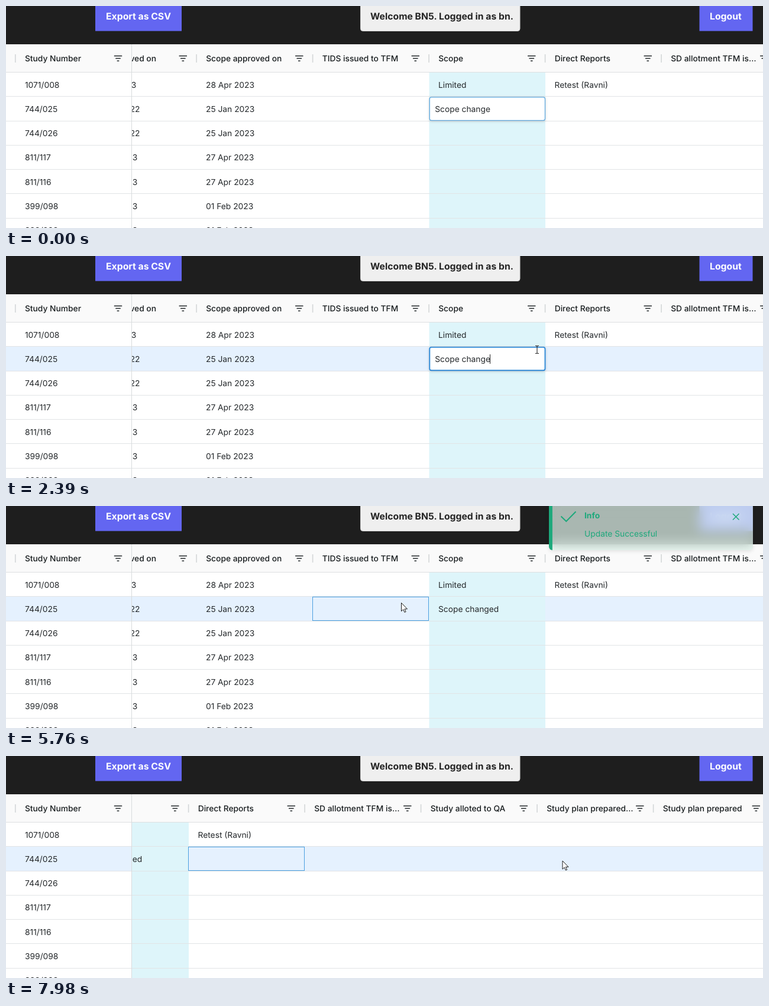
An HTML page for the animation above (8000 ms loop, 1280 by 377 pixels).

```html
<!DOCTYPE html>
<html lang="en">
<head>
<meta charset="utf-8">
<title>Study grid</title>
<style>
  html, body { margin: 0; width: 100%; height: 100%; overflow: hidden; background: #fff; }
  #stage { position: relative; width: 1280px; height: 377px; overflow: hidden; }
  svg { position: absolute; left: 0; top: 0; display: block; }
  text {
    font-family: Inter, Roboto, sans-serif; font-size: 13.8px;
    fill: #24282b; text-rendering: geometricPrecision; white-space: pre;
  }
  .head { font-weight: 500; fill: #181d1f; }
  .btn { font-size: 15.75px; font-weight: 700; fill: #fff; }
  .end { text-anchor: end; }
  #editor rect { fill: #fff; filter: drop-shadow(0 1px 2px rgba(0, 0, 0, .16)); }
  #toast {
    position: absolute; left: 918px; top: -5px; width: 344.5px; height: 80px;
    border-radius: 6px; overflow: hidden;
    background: rgba(228, 248, 240, .7);
    backdrop-filter: blur(10px);
    box-shadow: 0 2px 6px rgba(0, 0, 0, .1);
  }
  #toast text { fill: #1ea97c; }
  #toast path { fill: none; stroke: #1ea97c; }
</style>
</head>
<body>
<div id="stage">
  <svg id="view" width="1280" height="377" viewBox="0 0 1280 377">
    <defs><clipPath id="right"><rect x="213" y="65" width="1067" height="312"/></clipPath></defs>
    <rect width="1280" height="377" fill="#fff"/>
    <rect width="1280" height="65" fill="#1e1e1e"/>
    <rect x="151" y="-6" width="146" height="48.5" fill="#6366f1"/>
    <rect x="599.5" y="-6" width="269.5" height="48.5" rx="4" fill="#efefef" stroke="#d0d0d0"/>
    <rect x="1172.5" y="-6" width="90" height="48.5" fill="#6366f1"/>
    <text class="btn" x="169" y="23">Export as CSV</text>
    <text class="btn" x="616" y="23" style="fill:#242424">Welcome BN5. Logged in as bn.</text>
    <text class="btn" x="1190" y="23">Logout</text>
    <rect y="65" width="1280" height="47" fill="#fafafa"/>
    <rect id="hover" width="1280" height="41" fill="#e5f1fe"/>
    <g clip-path="url(#right)"><g id="cols"></g></g>
    <g id="lines"></g>
    <g id="pinned"></g>
    <g clip-path="url(#right)">
      <g id="over">
        <rect id="focus" y="154.5" width="196" height="40" fill="none" stroke="#4a9fe0"/>
        <g id="editor">
          <rect x="716.3" y="154.9" width="195.2" height="39.4" rx="3"/>
          <text x="725.2" y="179.9"></text>
          <path id="caret" stroke="#222"/>
        </g>
      </g>
    </g>
    <circle id="click" r="13" fill="#ff0" fill-opacity=".45"/>
    <path id="arrow" d="M0 0V14.2L3.3 11.2 5.4 16 7.6 15.1 5.5 10.4H10Z" fill="#fff" stroke="#1a1a1a"/>
    <path id="beam" d="M-3 -6.5H-1L0 -5.8 1 -6.5H3M0 -5.8V5.8M-3 6.5H-1L0 5.8 1 6.5H3" fill="none" stroke="#222" stroke-width="1.1"/>
  </svg>
  <div id="toast">
    <svg width="345" height="80" viewBox="918 -5 345 80">
      <rect x="918" y="-5" width="5.9" height="80" fill="#1ea97c"/>
      <path d="M938.5 17.5L947.3 26 963.5 9.5" stroke-width="2"/>
      <path d="M1229 13L1239.5 23.5M1239.5 13L1229 23.5" stroke-width="1.5"/>
      <text x="978" y="21" font-weight="700">Info</text>
      <text x="978" y="52">Update Successful</text>
    </svg>
  </div>
</div>
<script>
const NS = 'http://www.w3.org/2000/svg';
const LOOP = 8000, COL = 196.5, FIRST = 125.3;
const $ = id => document.getElementById(id);

function add(parent, tag, attrs, label) {
  const el = document.createElementNS(NS, tag);
  for (const k in attrs) el.setAttribute(k, attrs[k]);
  if (label) el.textContent = label;
  parent.appendChild(el);
  return el;
}

const colX = i => FIRST + COL * i;
const rowY = i => Math.floor(112.5 + 41.25 * i);
const baseY = i => 138.7 + 41.2 * i;

const heads = ['Study approved on', 'Scope approved on', 'TIDS issued to TFM', 'Scope', 'Direct Reports',
  'SD allotment TFM is…', 'Study alloted to QA', 'Study plan prepared…', 'Study plan prepared'];
const rows = [
  ['1071/008', '11 Apr 2023', '28 Apr 2023', 220.3],
  ['744/025', '28 Dec 2022', '25 Jan 2023', 226.5],
  ['744/026', '28 Dec 2022', '25 Jan 2023', 226.5],
  ['811/117', '17 Apr 2023', '27 Apr 2023', 222.3],
  ['811/116', '17 Apr 2023', '27 Apr 2023', 222.3],
  ['399/098', '17 Jan 2023', '01 Feb 2023', 222.3],
  ['399/099', '17 Jan 2023', '01 Feb 2023', 222.3]
];

function header(parent, x, label, endX) {
  add(parent, 'rect', { x: x - 0.5, y: 82, width: 1.6, height: 14, fill: '#d3d6d8' });
  add(parent, 'text', { class: endX ? 'head end' : 'head', x: endX || x + 16.4, y: 93.6 }, label);
  const c = x + 174;
  add(parent, 'path', {
    d: `M${c - 6.7} 84.7h13.4M${c - 4.3} 89h8.6M${c - 1.8} 93.3h3.6`,
    stroke: '#23282b', 'stroke-width': 1.5
  });
}

const cols = $('cols'), pinned = $('pinned'), lines = $('lines');

add(cols, 'rect', { x: colX(3) + 0.7, y: 113, width: COL, height: 264, fill: '#def5fa' });
heads.forEach((h, i) => header(cols, colX(i), h, i ? 0 : 254));
rows.forEach(([, a, b, end], i) => {
  add(cols, 'text', { class: 'end', x: end, y: baseY(i) }, a);
  add(cols, 'text', { x: colX(1) + 16.2, y: baseY(i) }, b);
});
const cell = (c, r, label) => add(cols, 'text', { x: colX(c) + 16.2, y: baseY(r) }, label);
cell(3, 0, 'Limited');
cell(4, 0, 'Retest (Ravni)');
const scopeCell = cell(3, 1, 'Scope changed');

for (let i = 0; i < 7; i++)
  add(lines, 'rect', { y: rowY(i), width: 1280, height: 1, fill: i ? '#e1e4e6' : '#dcdfe1' });
header(pinned, 15.5, 'Study Number');
rows.forEach(([n], i) => add(pinned, 'text', { x: 32, y: baseY(i) }, n));
add(pinned, 'rect', { x: 212, y: 65, width: 1, height: 312, fill: '#d8dbdd' });

// Held steps: [time, ...values]
const cursorSteps = [
  [790, 880, 366], [850, 889, 300], [920, 894, 235], [980, 897, 185], [1050, 898, 159],
  [3690, 896.5, 158], [5160, 876, 158], [5230, 822, 159], [5300, 745, 161], [5360, 692, 163],
  [5430, 668.5, 164.5], [6160, 728, 168], [6225, 880, 175], [6290, 941, 178]
];
const scrollSteps = [
  [0, 0], [7290, 40], [7360, 150], [7430, 285], [7500, 385],
  [7570, 445], [7640, 470], [7900, 520], [7980, 603]
];
const focusSteps = [[3690, 3], [5700, 2], [6560, 4]];
const clicks = [[2240, 2390], [5700, 5760], [6560, 6630]];

const at = (steps, t) => steps.filter(s => s[0] <= t).pop();
const show = (el, on) => { el.style.display = on ? '' : 'none'; };
const move = (el, x, y) => el.setAttribute('transform', `translate(${x} ${y})`);
const phase = (t, start, len) => {
  const d = Math.floor((t - start) / 68) * 68;
  return Math.min(1, Math.max(0, d / len));
};

const toast = $('toast'), editor = $('editor'), caret = $('caret');
const field = editor.querySelector('rect'), input = editor.querySelector('text');

function drawCursor(t) {
  const c = at(cursorSteps, t);
  const beam = c && t < 3690 && c[2] > 154 && c[2] < 195;
  show($('hover'), c);
  show($('beam'), beam);
  show($('arrow'), c && !beam);
  show($('click'), clicks.some(([a, b]) => t >= a && t < b));
  if (!c) return;
  const [, x, y] = c;
  $('hover').setAttribute('y', rowY(Math.floor((y - 112.5) / 41.25)) + 1);
  move($(beam ? 'beam' : 'arrow'), x, y);
  move($('click'), beam ? x - 2.5 : x, beam ? y - 1 : y);
}

function drawEditor(t) {
  const open = t < 3690, active = t >= 2240, typed = t >= 3090;
  show(editor, open);
  show(scopeCell, !open);
  input.textContent = typed ? 'Scope changed' : 'Scope change';
  field.setAttribute('stroke', active ? '#2f8ad8' : '#5fa9df');
  field.setAttribute('stroke-width', active ? 1.9 : 1.3);
  show(caret, active && t < 2790 || typed && t < 3620);
  caret.setAttribute('d', `M${typed ? 827.5 : 818.5} 167v16`);
}

function drawToast(t) {
  const a = phase(t, 3690, 340), b = phase(t, 6770, 270);
  const enter = 1 - (1 - a) ** 2, leave = b * b;
  show(toast, a > 0 && b < 1);
  toast.style.opacity = enter * (1 - leave);
  toast.style.transform = `translateY(${(1 - enter - leave) * 100}%)`;
}

function draw() {
  const t = performance.now() % LOOP;
  const shift = at(scrollSteps, t)[1];
  move(cols, -shift, 0);
  move($('over'), -shift, 0);
  const f = at(focusSteps, t);
  show($('focus'), f);
  if (f) $('focus').setAttribute('x', Math.round(colX(f[1])) + 0.5);
  drawCursor(t);
  drawEditor(t);
  drawToast(t);
  requestAnimationFrame(draw);
}
draw();
</script>
</body>
</html>
```
